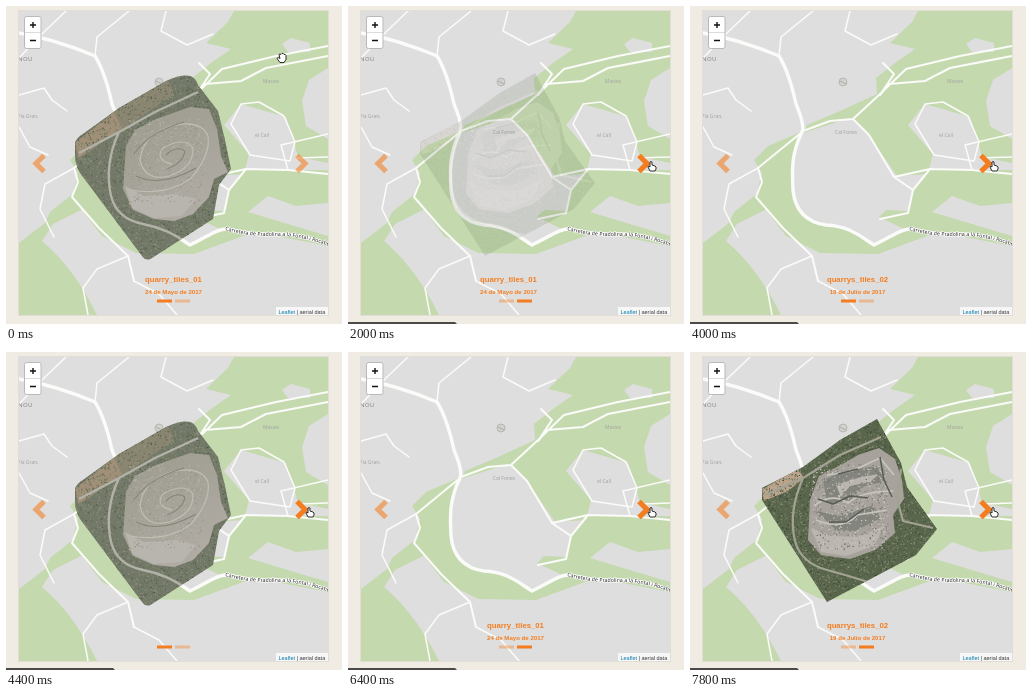
These frames come from a looping animation (336 px wide and 318 px high, 8 s). An HTML page:

```html
<!DOCTYPE html>
<html lang="es">
<head>
<meta charset="utf-8">
<title>Aerial map carousel</title>
<style>
  html, body { margin: 0; width: 100%; height: 100%; overflow: hidden; background: #f0ebe3; }
  svg { display: block; width: 336px; height: 318px; font-family: "Liberation Sans", Arial, sans-serif; }
  .land { fill: #c4daae; }
  .built { fill: #dedede; }
  .road { fill: none; stroke: #fbfbf9; stroke-linecap: round; stroke-linejoin: round; }
  .label { font: 5px "Noto Sans", sans-serif; fill: #a3a3a3; text-anchor: middle; }
  .chevron { fill: none; stroke: #f47d20; stroke-width: 5.2; }
  .lines { fill: none; stroke-linejoin: round; }
  #caption { fill: #f47d20; font-weight: bold; text-anchor: middle; }
  .bar { fill: #f47d20; }
</style>
</head>
<body>
<svg viewBox="0 0 336 318">
  <defs>
    <clipPath id="mapClip"><rect x="13" y="5" width="309" height="304"/></clipPath>
    <clipPath id="clip1"><path d="M69 138Q69 134 74 130L113 102L160 75Q176 68 184 70Q190 72 192 79L212 105L219 134L225 163L213 179L207 213L146 252Q140 256 136 250L74 167Q69 158 69 150Z"/></clipPath>
    <clipPath id="clip2"><path d="M72 136L113 115L150 88L187 67L211 111L217 135L247 177L226 203L137 250L72 148Z"/></clipPath>
    <path id="roadName" d="M219 224Q244 231 268 230T323 240"/>
    <linearGradient id="pit" x2=".6" y2="1">
      <stop stop-color="#9d9b8d"/><stop offset=".5" stop-color="#a5a298"/><stop offset="1" stop-color="#b0aca5"/>
    </linearGradient>
  </defs>

  <g clip-path="url(#mapClip)">
    <rect class="built" x="13" y="5" width="309" height="304"/>
    <g class="land">
      <path d="M228 5H322V62L303 74L296 95L300 120L322 133V157L292 151L287 133L280 111L235 98L218 119L243 148L238 168L207 170L176 125L160 112L113 127L117 119L150 105L187 88L186 72L205 57L225 43L200 37L222 16Z"/>
      <path d="M64 154L78 140L113 125L104 150L103 184L112 209L139 219L164 224L184 239L216 224L189 211L196 204L219 205L223 183L240 164L322 164V197L290 200L262 190L242 206L262 212L322 230V240L270 230L240 229L188 248L130 247L96 230L66 191L72 167Z"/>
      <path d="M13 237L39 217L44 206L68 187L77 203L47 218L36 235Q68 262 91 309H13Z"/>
    </g>
    <path class="built" d="M276 38L285 32L304 37V46L282 46Z"/>
    <g class="road">
      <path stroke-width="3.4" d="M13 27Q48 33 89 50Q99 66 106 98Q115 119 112 126C101 148 102 165 103 184C105 205 116 216 136 219C160 220 171 231 184 239C201 231 212 222 222 223Q244 229 268 228T322 238"/>
      <path stroke-width="2" d="M112 126L68 162L72 176L66 191L93 222L122 250L128 275M113 125L140 115L163 113L179 129L204 171L240 163L282 164L322 168M163 113L189 89L216 63L270 50L322 40M190 89L199 78L235 75L260 62L322 50M190 89L204 68L193 57M204 171L223 184L218 207L190 213M240 163L223 184"/>
      <path stroke-width="1.5" d="M60 5L38 26L13 52M89 50L91 31L123 5M13 89L38 82L46 94L61 105M13 121L24 141L42 149M68 162L39 178L34 203L48 231M122 250L91 263L77 282L82 309M128 275L153 288L171 309M235 98L225 118L244 149L284 155L289 136L278 110L253 96L235 98M282 164L275 139L322 128M291 152L322 151M160 5L155 25L181 39L207 28"/>
    </g>
    <g class="label">
      <text x="12" y="55" style="text-anchor:start;font-size:6px;letter-spacing:.4px;fill:#858585">NOU</text>
      <text x="22" y="112">Pla Gran,</text>
      <text x="156" y="128">Cal Fones</text>
      <text x="256" y="131">el Call</text>
      <text x="265" y="77">Masies</text>
    </g>
    <circle cx="153" cy="76" r="4" fill="#d3d3cd" stroke="#aaa" stroke-width=".7"/>
    <path d="M150 75L156 78" stroke="#aaa"/>

    <g id="photo1" clip-path="url(#clip1)">
      <rect x="65" y="65" width="165" height="192" fill="#737968"/>
      <path d="M69 137L113 102L162 74L168 88L116 124L75 151Z" fill="#8a8571"/>
      <path d="M69 137L108 106L116 122L98 135L72 152Z" fill="#a18f78"/>
      <g id="trees1"></g>
      <path d="M120 140L129 124L150 113L184 101L203 103L211 123L215 150L222 166L208 173L203 191L187 208L168 215L148 213L127 204L117 183Z" fill="url(#pit)"/>
      <path d="M119 180L138 190L170 188L190 193L176 210L148 212L126 202Z" fill="#b8b4ae"/>
      <g id="rubble1"></g>
      <g class="lines" stroke="#c0bdb2" stroke-width="1.2">
        <path d="M124 184Q160 190 184 173Q205 150 202 130Q194 113 165 120Q136 130 134 154Q139 176 163 170Q188 162 187 142Q178 130 157 142Q148 154 166 158"/>
        <path d="M128 148Q143 126 178 116M130 170Q155 182 190 162M160 149Q170 139 179 145Q177 157 161 163" stroke="#858578"/>
      </g>
      <path class="lines" stroke="#b3b2a8" stroke-width="2.4" d="M73 147L113 126L149 106L192 86M113 126Q98 158 105 190Q111 213 137 218T182 238"/>
    </g>

    <g id="photo2" clip-path="url(#clip2)">
      <rect x="65" y="62" width="185" height="192" fill="#59664b"/>
      <path d="M72 137L108 117L114 126L98 139L74 149Z" fill="#bda58d"/>
      <g id="trees2"></g>
      <path d="M120 148L129 124L151 113L168 103L189 96L205 107L212 128L214 147L203 163L205 181L185 198L160 207L131 203L118 188Z" fill="#a7a39c"/>
      <path d="M133 128L154 119L186 114L196 129L172 135L160 149L137 151ZM126 159L151 164L183 153L191 166L165 179L145 177Z" fill="#85857f"/>
      <path d="M146 133L171 125L189 122L180 130L160 134L151 145ZM121 177L145 184L168 185L194 174L184 194L156 204L131 200Z" fill="#bab5ae"/>
      <g id="rubble2"></g>
      <g class="lines" stroke="#c8c5bd" stroke-width="1.7">
        <path d="M124 154Q141 140 158 151Q172 139 203 139M126 168Q153 179 167 163L197 158M137 123L162 119L190 106L204 123"/>
        <path d="M75 143L113 126L150 103L191 85M113 126Q98 160 105 189Q111 211 137 218T184 232M211 117L207 147L213 169L243 176" stroke="#a3a394" stroke-width="2.2"/>
      </g>
      <path class="lines" d="M128 147L143 152L160 144L178 146M139 170L156 170L174 157M148 122L168 117M190 105L194 128L202 145" stroke="#575c54" stroke-width="1.5"/>
    </g>

    <text font-size="5.3" fill="#242424" stroke="#fff" stroke-width="1.2" paint-order="stroke" style="font-family:'Noto Sans',sans-serif"><textPath href="#roadName">Carretera de Pradolina a la Fontal i Rocabell B5</textPath></text>

    <rect x="18.5" y="10.5" width="16.5" height="32" rx="2" fill="#fff" stroke="#b9b9b9"/>
    <path d="M19 26.5H35" stroke="#ccc" stroke-width=".7"/>
    <path d="M24 19H30M27 16V22M24 34.5H30" stroke="#111" stroke-width="1.4"/>

    <path class="chevron" opacity=".58" d="M38 149.5L30 157.5L38 165.5"/>
    <path class="chevron" id="next" d="M291 149.5L299 157.5L291 165.5"/>
    <g id="caption">
      <text id="title" x="167.5" y="276" font-size="7.75"></text>
      <text id="date" x="167.5" y="288" font-size="6.1"></text>
    </g>
    <rect class="bar" id="bar1" x="151" y="293.5" width="15" height="3"/>
    <rect class="bar" id="bar2" x="169" y="293.5" width="15" height="3"/>

    <rect x="270" y="301" width="52" height="8" fill="#fff" opacity=".75"/>
    <text x="272.5" y="307.5" font-size="5.5" fill="#333"><tspan fill="#0078a8">Leaflet</tspan> | aerial data</text>
  </g>
  <rect x="12.5" y="4.5" width="310" height="305" fill="none" stroke="#e2ddd5"/>
  <path id="status" d="M0 316H107L109 318H0Z" fill="#4b4a48"/>

  <g id="cursor" fill="#fff" stroke="#171717" stroke-width=".9" stroke-linejoin="round">
    <path id="openHand" d="M-2 5L-5 1Q-4 -1 -2 1L-3 -3Q-2 -4 -1 -3L0 -4Q1 -5 2 -3Q3 -4 4 -2L4 2L2 5Z"/>
    <path id="pointer" d="M-2 5L-4 1Q-4 -1 -2 1V-4Q-1 -5 0 -4V-1L3 0L4 1V3L3 5Z"/>
  </g>
</svg>
<script>
  const LOOP = 8000, STEP = 200;
  const el = id => document.getElementById(id);
  const clamp = v => Math.max(0, Math.min(1, v));
  const slides = [
    { title: "quarry_tiles_01", date: "24 de Mayo de 2017" },
    { title: "quarrys_tiles_02", date: "19 de Julio de 2017" }
  ];
  // Fade of the new photo, caption shift and caption opacity, 200 ms apart.
  const firstSwap = [[.15, -7, 1], [.68, -130, .45], [1, 0, 0]];
  const swap = [[0, 0, 1], [.55, -130, .45], [1, 0, 0]];
  const changes = [
    { at: 2000, to: 1, steps: firstSwap, captionAt: 2800 },
    { at: 4000, to: 0, steps: swap, captionAt: 4800 },
    { at: 6400, to: 1, steps: swap, captionAt: 7200 }
  ];
  const captionFade = [.15, .5, .85, 1];
  const forest = { x: 68, y: 66, w: 180, h: 188 };
  const quarry = { x: 122, y: 112, w: 76, h: 86 };

  function scatter(id, seed, area, colors, count) {
    const random = () => (seed = (seed * 16807) % 2147483647) / 2147483647;
    for (const color of colors) {
      let d = "";
      for (let i = 0; i < count; i++) {
        const x = area.x + random() * area.w, y = area.y + random() * area.h;
        d += `M${x.toFixed(1)} ${y.toFixed(1)}h${(.6 + random()).toFixed(1)}`;
      }
      const path = document.createElementNS("http://www.w3.org/2000/svg", "path");
      path.setAttribute("d", d);
      path.setAttribute("stroke", color);
      path.setAttribute("stroke-width", 1.2);
      el(id).append(path);
    }
  }

  function stateAt(t) {
    const change = changes.filter(c => t >= c.at).pop();
    if (!change) return { photo: 0, caption: 0, fade: 1, shift: 0, alpha: 1 };
    const [fade, shift, leaving] = change.steps[Math.min(2, (t - change.at) / STEP)];
    const entering = t >= change.captionAt;
    return {
      photo: change.to, fade, shift,
      caption: entering ? change.to : 1 - change.to,
      alpha: entering ? captionFade[Math.min(3, (t - change.captionAt) / STEP)] : leaving
    };
  }

  function moveCursor(t) {
    const p = clamp((t - 400) / 1200), eased = p * p * (3 - 2 * p);
    const over = t >= 1400;
    el("cursor").setAttribute("transform", `translate(${276 + 28 * eased} ${51.5 + 108.5 * eased})`);
    el("openHand").style.display = over ? "none" : "";
    el("pointer").style.display = over ? "" : "none";
    el("next").style.opacity = over ? 1 : .58;
  }

  function render(now) {
    const t = Math.floor((now % LOOP) / STEP) * STEP;
    const s = stateAt(t);
    [0, 1].forEach(i => {
      el(`photo${i + 1}`).style.opacity = s.photo === i ? s.fade : 0;
      el(`bar${i + 1}`).style.opacity = s.photo === i ? 1 : .4;
    });
    el("title").textContent = slides[s.caption].title;
    el("date").textContent = slides[s.caption].date;
    el("caption").setAttribute("transform", `translate(${s.shift} 0)`);
    el("caption").style.opacity = s.alpha;
    el("status").style.display = t >= 1800 ? "" : "none";
    moveCursor(t);
  }

  scatter("trees1", 71, forest, ["#525d47", "#69745a", "#84896f", "#8f907c"], 1400);
  scatter("trees2", 29, forest, ["#3a4735", "#4c5b42", "#71785f", "#8b8d78"], 1400);
  scatter("rubble1", 43, quarry, ["#96948a", "#b5b2a9"], 250);
  scatter("rubble2", 17, quarry, ["#77776f", "#c9c5be"], 350);
  const start = performance.now();
  function tick() {
    render(performance.now() - start);
    requestAnimationFrame(tick);
  }
  tick();
</script>
</body>
</html>
```
